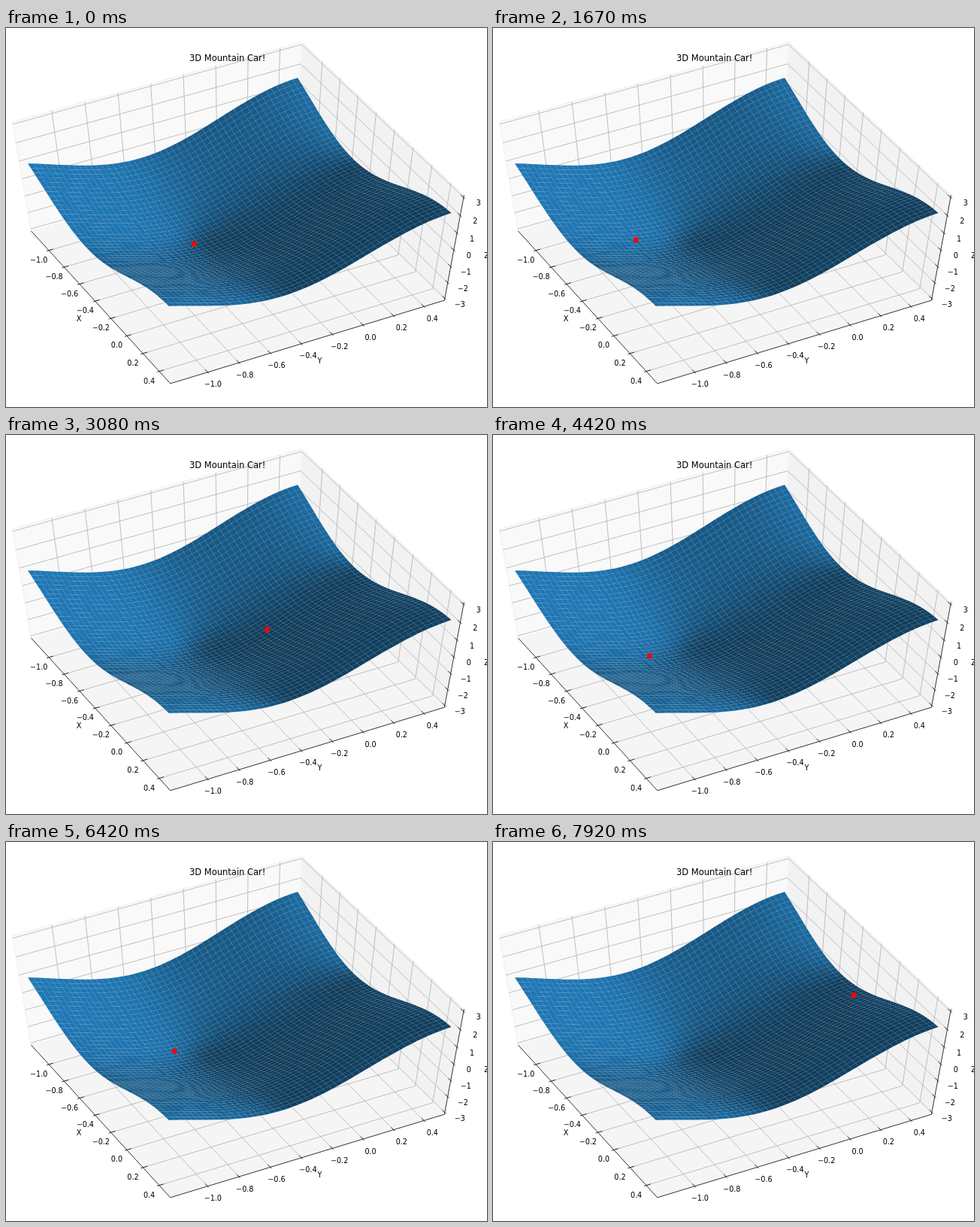
An HTML page with a canvas for the animation above (8 s loop, 640 by 504 pixels).

```html
<!DOCTYPE html>
<html lang="en">
<head>
<meta charset="utf-8">
<title>3D Mountain Car!</title>
<style>
  html, body { margin: 0; width: 100%; height: 100%; overflow: hidden; background: #fff; }
  canvas { display: block; }
</style>
</head>
<body>
<canvas id="stage" width="640" height="504"></canvas>
<script>
const W = 640, H = 504, LOOP = 8000, STEPS = 96;
const view = document.getElementById('stage').getContext('2d');
const plot = document.createElement('canvas');
plot.width = W;
plot.height = H;
const g = plot.getContext('2d');

// Camera: perspective from distance 10, centred on the unit box.
const RAD = Math.PI / 180, AZ = 28.08 * RAD, EL = 58.3 * RAD;
const s = Math.sin(AZ), c = Math.cos(AZ), se = Math.sin(EL), ce = Math.cos(EL);
const B = 0.5 + 1 / 48;
const LO = -1.2, HI = 0.5, LIFT = 0.01;

const unit = v => (v - (LO + HI) / 2) / (HI - LO);
const height = (x, y) => Math.sin(3 * x) + Math.sin(3 * y);

function project(u, v, w) {
  const depth = 10 - (u * c * ce - v * s * ce + w * se);
  const right = u * s + v * c;
  const up = -u * c * se + v * s * se + w * ce;
  return [305.4 + 4075 * right / depth, 247.4 - 2600 * up / depth];
}

const onSurface = (x, y, lift) => project(unit(x), unit(y), height(x, y) / 6 + lift);

function trace(points) {
  g.beginPath();
  points.forEach(p => g.lineTo(p[0], p[1]));
}

function line(color, width, ...corners) {
  trace(corners.map(p => project(...p)));
  g.strokeStyle = color;
  g.lineWidth = width;
  g.stroke();
}

function pane(color, ...corners) {
  trace(corners.map(p => project(...p)));
  g.closePath();
  g.fillStyle = color;
  g.fill();
}

function label(text, x, y, size = 9.6) {
  g.font = size + 'px "DejaVu Sans", sans-serif';
  g.textAlign = 'center';
  g.fillStyle = '#000';
  g.fillText(text, x, y + size * 0.365);
}

// Blue scaled between half and full brightness by the angle to the light.
function shade(x, y) {
  const a = 3 * Math.cos(3 * x), b = 3 * Math.cos(3 * y);
  const light = (-a - b - 0.5) / Math.hypot(a, b, 1);
  const f = Math.min(1, Math.max(0.5, 0.5 + 0.5 * (light + 1.49) / 2.75));
  return `rgb(${[31, 119, 180].map(v => Math.round(v * f))})`;
}

function drawSurface() {
  const n = 50, d = (HI - LO) / n;
  const at = (x, y) => onSurface(x, y, LIFT);
  for (let i = 0; i < n; i++) {
    for (let j = n - 1; j >= 0; j--) {
      const x = LO + i * d, y = LO + j * d;
      trace([at(x, y), at(x + d, y), at(x + d, y + d), at(x, y + d)]);
      g.closePath();
      g.fillStyle = shade(x + d / 2, y + d / 2);
      g.fill();
    }
  }
}

function drawPlot() {
  g.fillStyle = '#fff';
  g.fillRect(0, 0, W, H);

  pane('#f9f9f9', [-B, -B, -B], [-B, B, -B], [-B, B, B], [-B, -B, B]);
  pane('#f2f2f2', [-B, B, -B], [B, B, -B], [B, B, B], [-B, B, B]);
  pane('#f5f5f5', [-B, -B, -B], [B, -B, -B], [B, B, -B], [-B, B, -B]);
  line('#f0f0f0', 1, [-B, -B, -B], [-B, -B, B], [-B, B, B], [B, B, B]);

  const grid = '#b0b0b0';
  const ticks = [-1, -0.8, -0.6, -0.4, -0.2, 0, 0.2, 0.4];
  const levels = [-3, -2, -1, 0, 1, 2, 3];
  ticks.forEach(t => {
    const k = unit(t);
    line(grid, 0.8, [k, -B, -B], [k, B, -B], [k, B, B]);
    line(grid, 0.8, [B, k, -B], [-B, k, -B], [-B, k, B]);
  });
  levels.forEach(z => line(grid, 0.8, [-B, -B, z / 6], [-B, B, z / 6], [B, B, z / 6]));

  line('#000', 0.8, [-B, -B, -B], [B, -B, -B], [B, B, -B], [B, B, B]);
  const inner = B - 1 / 60, outer = B + 1 / 120;
  const name = (v, digits) => v.toFixed(digits).replace('-', '\u2212');
  ticks.forEach(t => {
    const k = unit(t);
    line('#000', 0.8, [k, -inner, -B], [k, -outer, -B]);
    line('#000', 0.8, [inner, k, -B], [outer, k, -B]);
    const [ax, ay] = project(k, -B, -B), [bx, by] = project(B, k, -B);
    label(name(t, 1), ax - 13.3, ay + 12.5);
    label(name(t, 1), bx + 9 + 5 * k, by + 16);
  });
  levels.forEach(z => {
    line('#000', 0.8, [inner, B, z / 6], [outer, B, z / 6]);
    const [zx, zy] = project(B, B, z / 6);
    label(name(z, 0), zx + 20, zy + 7.6);
  });

  drawSurface();
  label('X', 97, 386.5);
  label('Y', 417.5, 442);
  label('Z', 639.5, 302);
  label('3D Mountain Car!', 294.7, 40.3, 11.5);
}

// Car path: step, x, y. It starts at rest and swings wider each time.
const PATH = [
  [0, -0.49, -0.544], [10, -0.544, -0.659], [20, -0.603, -0.773], [28, -0.534, -0.564],
  [37, -0.383, -0.13], [39.5, -0.371, -0.104], [46, -0.392, -0.289], [53, -0.496, -0.742],
  [61, -0.703, -1.115], [65, -0.729, -1.157], [77, -0.597, -0.614], [84, -0.354, -0.054],
  [90, -0.214, 0.246], [95, -0.261, 0.432]
];

function slope(i, k) {
  if (i === 0) return 0;
  const p = PATH[i], a = PATH[i - 1], b = PATH[i + 1];
  const ha = p[0] - a[0], da = (p[k] - a[k]) / ha;
  if (!b) return da;
  const hb = b[0] - p[0], db = (b[k] - p[k]) / hb;
  return (da * hb + db * ha) / (ha + hb);
}

function along(step, k) {
  const i = Math.max(1, PATH.findIndex(p => p[0] >= step));
  const p = PATH[i - 1], q = PATH[i], h = q[0] - p[0], t = (step - p[0]) / h;
  const t2 = t * t, t3 = t2 * t;
  return p[k] * (2 * t3 - 3 * t2 + 1) + q[k] * (3 * t2 - 2 * t3)
    + h * (slope(i - 1, k) * (t3 - 2 * t2 + t) + slope(i, k) * (t3 - t2));
}

function frame() {
  const t = performance.now() % LOOP;
  const step = Math.min(STEPS - 1, Math.floor((t + 4) * STEPS / LOOP));
  const [x, y] = onSurface(along(step, 1), along(step, 2), LIFT / 3);
  view.drawImage(plot, 0, 0);
  view.beginPath();
  view.arc(x, y, 3.5, 0, 2 * Math.PI);
  view.fillStyle = '#f00';
  view.fill();
  requestAnimationFrame(frame);
}

drawPlot();
frame();
</script>
</body>
</html>
```
